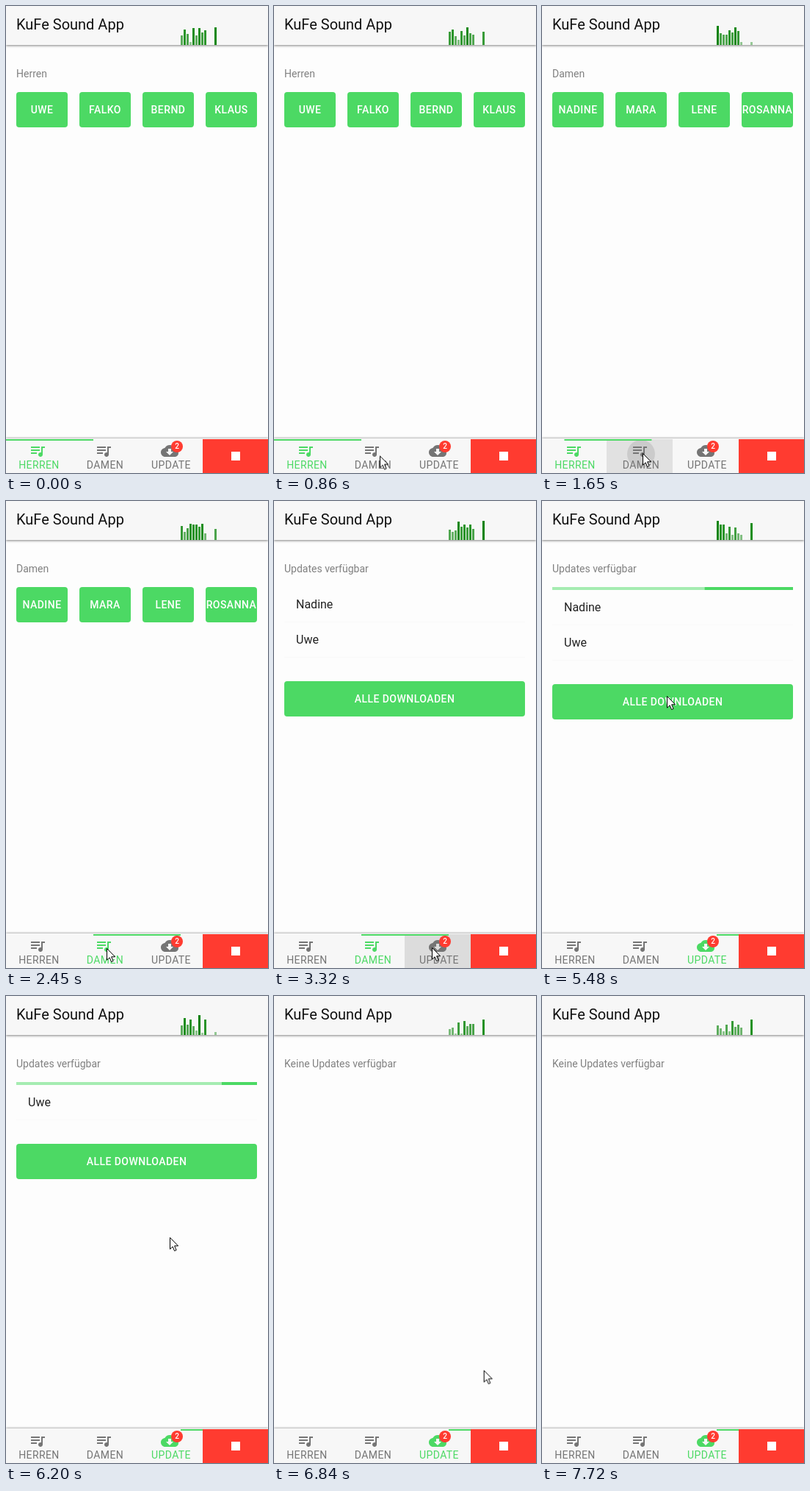
Recreate the animation shown at these times as an HTML page. Size 357 px wide and 635 px high, loop 7800 ms.

```html
<!DOCTYPE html>
<html lang="de">
<head>
<meta charset="utf-8">
<title>Sound App</title>
<style>
  :root { --green: #4cd964; --red: #ff3b30; }
  * { box-sizing: border-box; }
  html, body { margin: 0; width: 100%; height: 100%; overflow: hidden; background: #fdfdfd; }
  body { font: 14px/20px Roboto, sans-serif; }
  #stage { position: relative; width: 357px; height: 635px; overflow: hidden; }
  header { position: absolute; inset: 0 0 auto; height: 53px; padding-left: 14px; overflow: hidden;
    background: #f7f7f7; box-shadow: 0 1px 3px rgba(0,0,0,.5); font-size: 20px; line-height: 50px; color: #111; }
  .bar { position: absolute; bottom: -1px; width: 3px; background: #008000; }
  .page { position: absolute; left: 14px; top: 82px; width: 328px; }
  .page h2 { margin: 0 0 15px; font: inherit; color: #808080; }
  .row { display: flex; gap: 16px; }
  .btn { position: relative; display: flex; align-items: center; justify-content: center; flex: 1 0 70px;
    width: 70px; height: 48px; border-radius: 4px; overflow: hidden; background: var(--green); color: #fff;
    font-weight: 500; letter-spacing: .45px; padding-bottom: 1px; white-space: nowrap; }
  .btn b { position: relative; font-weight: 500; }
  .item { height: 48px; padding-left: 16px; border-bottom: 1px solid #f9f9f9; font-size: 16px; line-height: 47px; color: #222; }
  #all { width: 100%; margin-top: 32px; }
  #progress { position: relative; height: 4px; overflow: hidden; background: #a5ecb1; }
  #progress div { position: absolute; top: 0; width: 100%; height: 4px; }
  #progress i { display: block; height: 4px; background: var(--green); }
  footer { position: absolute; inset: 588px 0 0; background: #f7f7f7; box-shadow: 0 0 3px rgba(0,0,0,.55); }
  .tab { position: absolute; top: 1px; width: 90px; height: 46px; overflow: hidden; color: #757575; }
  .tab.on { color: var(--green); }
  .tab span { position: absolute; top: 25px; width: 94px; text-align: center; letter-spacing: .4px; }
  .tab svg { position: absolute; left: 33px; top: 4px; fill: currentColor; }
  .press { position: absolute; inset: 0; background: #000; opacity: 0; }
  .ripple { position: absolute; width: 200px; height: 200px; margin: -100px; border-radius: 50%; opacity: 0; background: #000; }
  .badge { position: absolute; left: 47px; top: 2px; width: 16px; height: 16px; border-radius: 8px;
    background: var(--red); color: #fff; font: 500 10px/16px Roboto, sans-serif; text-align: center; }
  #line { position: absolute; top: 1px; left: 0; width: 119px; height: 2px; background: var(--green); }
  #stop { position: absolute; left: 268px; top: 1px; width: 89px; height: 46px; background: var(--red); }
  #stop::after { content: ""; position: absolute; left: 39px; top: 17px; width: 12px; height: 12px; background: #fff; }
  #cursor { position: absolute; left: 0; top: 0; overflow: visible; }
</style>
</head>
<body>
<div id="stage">
  <div class="page"><h2>Herren</h2><div class="row"></div></div>
  <div class="page"><h2>Damen</h2><div class="row"></div></div>
  <div class="page">
    <h2 id="status"></h2>
    <div id="progress"><div style="left:-145.166611%"><i></i></div><div style="left:-54.888891%"><i></i></div></div>
    <div class="item">Nadine</div>
    <div class="item">Uwe</div>
    <div class="btn" id="all"><div class="ripple" style="left:161px;top:24px;background:#fff"></div><b>ALLE DOWNLOADEN</b></div>
  </div>
  <header>KuFe Sound App</header>
  <footer><div id="line"></div><div id="stop"></div></footer>
  <svg id="cursor" width="13" height="20"><path d="M.5 .5V16.2L4.1 12.8L6.6 18.6L9.1 17.5L6.6 11.8H11.6Z" fill="#fff" stroke="#000"/></svg>
</div>
<script>
const LOOP = 7800, STEP = 79.75, LEAD = 30, LIVE_STEP = 78.25;
const DOWNLOAD = 4340, FIRST_DONE = 5640, ALL_DONE = 6800;
const $ = s => document.querySelector(s), $$ = s => [...document.querySelectorAll(s)];
const add = (parent, cls, html = '') => {
  const el = document.createElement('div');
  el.className = cls;
  el.innerHTML = html;
  return parent.appendChild(el);
};
const loopAnims = [], liveAnims = [];

// Steps: [time, style, easing to the next step]
function track(el, steps) {
  const frames = steps.map(([t, style, easing = 'linear']) => ({ ...style, easing, offset: t / LOOP }));
  frames.unshift({ ...frames[0], offset: 0, easing: 'linear' });
  frames.push({ ...frames[frames.length - 1], offset: 1 });
  const anim = el.animate(frames, { duration: LOOP, fill: 'both' });
  anim.pause();
  loopAnims.push(anim);
}
function live(el, frames, options) {
  const anim = el.animate(frames, { iterations: Infinity, ...options });
  anim.pause();
  liveAnims.push(anim);
}

// Sound buttons
const people = [['UWE', 'FALKO', 'BERND', 'KLAUS'], ['NADINE', 'MARA', 'LENE', 'ROSANNA']];
$$('.row').forEach((row, i) => people[i].forEach(name => add(row, 'btn', name)));

// Equalizer: [duration, starting phase]
[[474, 1.56], [433, .76], [407, 1.48], [458, 1.92], [400, 1.16],
 [427, 1.56], [441, 1.16], [419, 1.4], [487, .72], [555, 1.1]].forEach(([duration, phase], i) => {
  const bar = add($('header'), 'bar');
  bar.style.left = (i < 9 ? 238 + 4 * i : 284) + 'px';
  live(bar, [{ height: '3px', opacity: .35 }, { height: '28px', opacity: 1 }],
    { duration, delay: -phase * duration, direction: 'alternate' });
});

// Indeterminate progress: [offset, value, bezier]
const curve = (steps, style) => steps.map(([offset, v, b]) =>
  ({ offset, transform: style(v), easing: b ? `cubic-bezier(${b})` : 'linear' }));
const slide = v => `translateX(${v}%)`, stretch = v => `scaleX(${v})`;
const motions = [
  [[[0, 0], [.2, 0, '.5,0,.701732,.495819'], [.5915, 83.67142, '.302435,.381352,.55,.956352'], [1, 200.611057]],
   [[0, .08], [.3665, .08, '.334731,.12482,.785844,1'], [.6915, .661479, '.06,.11,.6,1'], [1, .08]]],
  [[[0, 0, '.15,0,.515058,.409685'], [.25, 37.651913, '.31033,.284058,.8,.733712'],
    [.4835, 84.386165, '.4,.627035,.6,.902026'], [1, 160.277782]],
   [[0, .08, '.205028,.057051,.57661,.453971'], [.1915, .457104, '.152313,.196432,.648374,1.004315'],
    [.4415, .72796, '.257759,-.003163,.211762,1.38179'], [1, .08]]]
];
$$('#progress div').forEach((el, i) => {
  live(el, curve(motions[i][0], slide), { duration: 2000, delay: 4287 });
  live(el.firstChild, curve(motions[i][1], stretch), { duration: 2000, delay: 4387, fill: 'backwards' });
});

// Tabs
const music = 'M15 6H3v2h12V6zm0 4H3v2h12v-2zM3 16h8v-2H3v2zM17 6v8.18c-.31-.11-.65-.18-1-.18-1.66 0-3 1.34-3 3s1.34 3 3 3 3-1.34 3-3V8h3V6h-5z';
const cloud = 'M19.35 10.04C18.67 6.59 15.64 4 12 4 9.11 4 6.6 5.64 5.35 8.04 2.34 8.36 0 10.91 0 14c0 3.31 2.69 6 6 6h13c2.76 0 5-2.24 5-5 0-2.64-2.05-4.78-4.65-4.96zM17 13l-5 5-5-5h3V9h4v4h3z';
const tabs = [['HERREN', music], ['DAMEN', music], ['UPDATE', cloud]].map(([label, path], i) => {
  const tab = add($('footer'), 'tab',
    `<div class="press"></div><div class="ripple" style="left:47px;top:20px"></div>
     <svg width="24" height="24"><path d="${path}"/></svg><span>${label}</span>`);
  tab.style.left = 90 * i - 2 + 'px';
  return tab;
});
add(tabs[2], 'badge', '2');
$('footer').append($('#line'), $('#stop'));

const ring = (r, opacity) => ({ transform: `scale(${r / 100})`, opacity });
function press(tab, t, depth, r0, r1) {
  track(tab.querySelector('.press'), [[t - 1, { opacity: 0 }], [t, { opacity: .09 }],
    [t + 250, { opacity: .09 }], [t + 450, { opacity: 0 }]]);
  track(tab.querySelector('.ripple'), [[t - 1, ring(r0, 0)], [t, ring(r0, depth)], [t + 80, ring(r1, depth)],
    [t + 280, ring(r1 + 45, depth)], [t + 450, ring(r1 + 60, 0)]]);
}
press(tabs[1], 1565, .1, 6, 19);
press(tabs[2], 3238, .02, 30, 70);
track($('#all .ripple'), [[DOWNLOAD - 90, ring(10, 0)], [DOWNLOAD - 85, ring(10, .18)], [4675, ring(117, .18)],
  [4850, ring(175, .18)], [5080, ring(190, 0)]]);

const at = (x, y) => ({ transform: `translate(${x}px, ${y}px)` });
track($('#line'), [[1590, at(0, 0), 'ease'], [1890, at(119, 0)], [3330, at(119, 0), 'ease'], [3630, at(238, 0)]]);
track($('#cursor'), [
  [380, at(200, 640)], [780, at(153, 616), 'ease-out'], [950, at(137, 608)],
  [2500, at(137, 608), 'ease-in-out'], [3050, at(215, 607)],
  [3340, at(215, 607), 'ease-in'], [3960, at(210, 349), 'ease-out'], [4220, at(170, 265)],
  [5700, at(170, 265), 'ease-in-out'], [6195, at(223, 328)], [6360, at(240, 384)],
  [7160, at(318, 597)], [7300, at(333, 640)]
]);

const pages = $$('.page'), items = $$('.item');
const show = (el, on) => { el.style.display = on ? '' : 'none'; };

function draw(time) {
  const index = Math.min(97, Math.floor((time + LEAD) / STEP));
  const t = Math.max(0, index * STEP - LEAD);
  loopAnims.forEach(a => { a.currentTime = t; });
  liveAnims.forEach(a => { a.currentTime = index * LIVE_STEP; });

  const page = t < 1640 ? 0 : t < 3235 ? 1 : 2;
  const active = t < 1720 ? 0 : t < 3400 ? 1 : 2;
  pages.forEach((el, i) => show(el, i === page));
  tabs.forEach((el, i) => el.classList.toggle('on', i === active));

  const done = t >= ALL_DONE;
  $('#status').textContent = done ? 'Keine Updates verfügbar' : 'Updates verfügbar';
  show($('#progress'), t >= DOWNLOAD && !done);
  show(items[0], t < FIRST_DONE);
  show(items[1], !done);
  show($('#all'), !done);
}

const start = performance.now();
function tick() {
  draw((performance.now() - start) % LOOP);
  requestAnimationFrame(tick);
}
tick();
</script>
</body>
</html>
```
